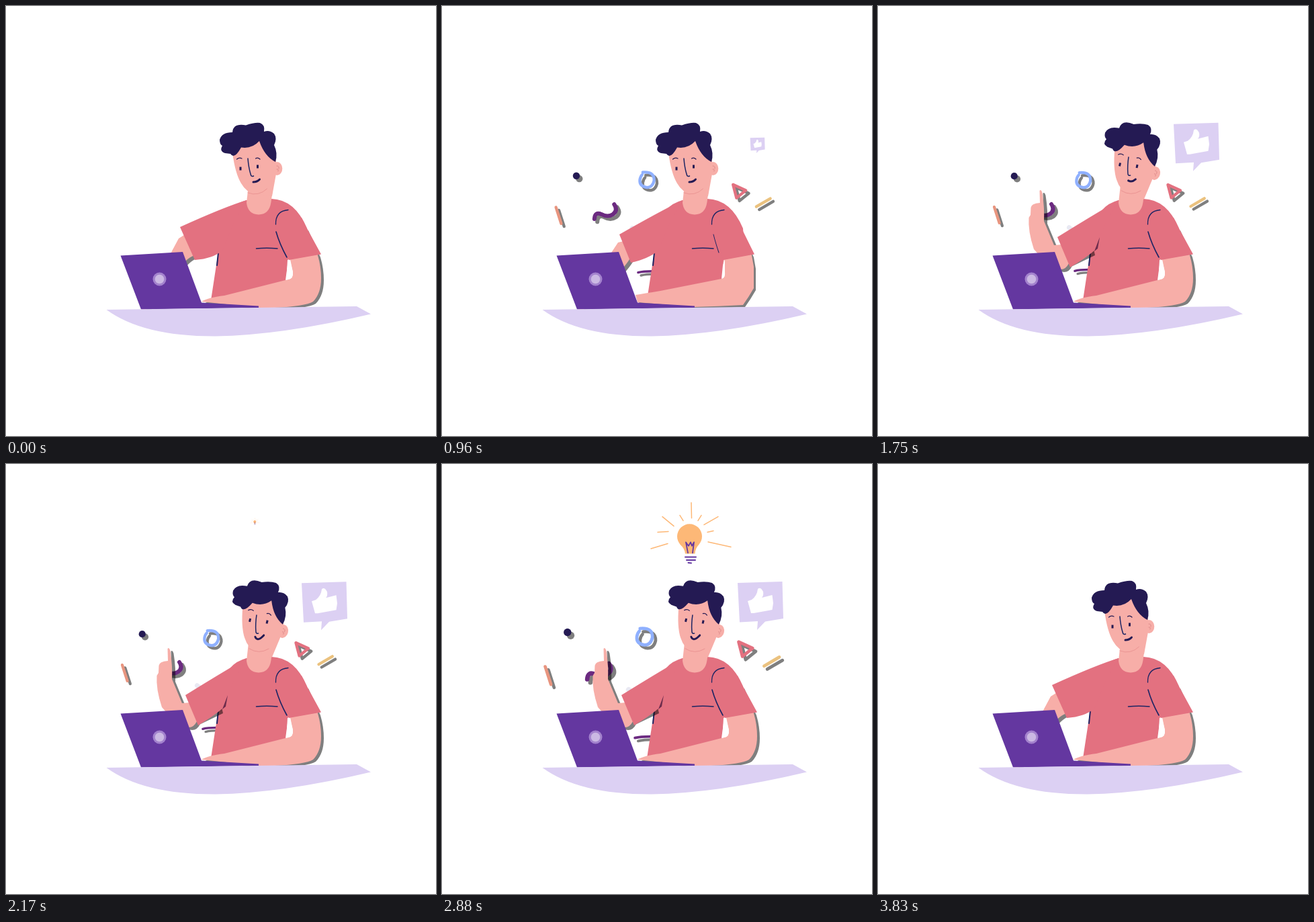
An HTML page with a canvas that plays this animation: 640x640 px, repeating every 3.87 s.

```html
<!DOCTYPE html>
<html lang="en">
<head>
<meta charset="utf-8">
<title>Idea at the laptop</title>
<style>
  html, body { margin: 0; width: 100%; height: 100%; overflow: hidden; background: #fff; }
  canvas { display: block; }
</style>
</head>
<body>
<canvas id="stage" width="640" height="640"></canvas>
<script>
const ctx = document.getElementById('stage').getContext('2d');
const LOOP = 3870, FPS = 24;
const SKIN = '#f7aea8', SHIRT = '#e37180', NAVY = '#241a53', LINE = '#1b2463',
      PURPLE = '#6437a0', PLUM = '#6b2a80', LILAC = '#dcd0f3', ORANGE = '#fdb877';

const clamp = v => Math.max(0, Math.min(1, v));
const smooth = v => (v = clamp(v), v * v * (3 - 2 * v));
const lerp = (a, b, k) => a + (b - a) * k;

function fill(path, color) {
  ctx.fillStyle = color;
  ctx.fill(new Path2D(path));
}
function stroke(path, color, width) {
  ctx.strokeStyle = color;
  ctx.lineWidth = width;
  ctx.stroke(new Path2D(path));
}
function disc(x, y, r, color) {
  ctx.fillStyle = color;
  ctx.beginPath();
  ctx.arc(x, y, r, 0, 7);
  ctx.fill();
}
function shadow(x, y) {
  ctx.shadowColor = 'rgba(0,0,0,.5)';
  ctx.shadowOffsetX = x;
  ctx.shadowOffsetY = y;
}
function group(draw) {
  ctx.save();
  draw();
  ctx.restore();
}
function scaleAbout(x, y, s, dy = 0) {
  ctx.translate(x, y + dy);
  ctx.scale(s, s);
  ctx.translate(-x, -y);
}

// Blend two path strings of the same structure
function mix(a, b, k) {
  const number = /-?[\d.]+/g, target = b.match(number);
  let i = 0;
  return a.replace(number, v => lerp(+v, +target[i++], k));
}

// Eased value between [time, value] keys; values are arrays
function track(keys, t) {
  let i = 0;
  while (i < keys.length - 2 && t >= keys[i + 1][0]) i++;
  const [t0, a] = keys[i], [t1, b] = keys[i + 1];
  const k = smooth((t - t0) / (t1 - t0));
  return a.map((v, j) => lerp(v, b[j], k));
}

// Poses: sleeve hem top, hem bottom, shoulder curve, crook, elbow, upper arm, hand offset
const TYPE_UP = [259, 329, 281, 378, 325, 299, 257, 346, 262, 377, 295, 350, -28, 97];
const TYPE_DOWN = [264, 340, 281, 382, 320, 308, 262, 352, 270, 393, 295, 350, -28, 97];
const LOW = [268, 348, 288, 391, 320, 310, 268, 358, 278, 408, 300, 350, 0, 100];
const POINT = [267, 344, 286, 389, 317, 313, 262, 356, 272, 408, 318, 367, 0, 0];
const LOWER = [266, 341, 285, 388, 319, 311, 259, 356, 274, 398, 300, 355, 3, 28];
const ARM = [[80, TYPE_UP], [205, TYPE_DOWN], [392, TYPE_UP], [580, TYPE_DOWN], [767, TYPE_UP],
  [955, TYPE_DOWN], [1330, LOW], [1620, POINT], [3180, POINT], [3330, LOWER], [3470, LOW], [3640, TYPE_UP]];
const TILT = [[1080, [0]], [1580, [12.5]], [3080, [12.5]], [3580, [0]]];
const SMILE = [[1650, [0]], [1950, [1]], [3350, [1]], [3600, [0]]];

function burstScale(t) {
  if (t < 500) return 1.015 * clamp((t - 340) / 160);
  if (t < 700) return lerp(1.015, 0.985, (t - 500) / 200);
  const pulse = 0.9175 + 0.0675 * Math.cos((t - 700) / 420 * 2 * Math.PI);
  return pulse * clamp((3342 - t) / 125);
}

function burst(t) {
  const s = burstScale(t);
  if (s <= 0) return;
  group(() => {
    scaleAbout(343, 277, s);
    shadow(5 * s, 5 * s);
    disc(178, 249, 6, NAVY);
    stroke('M143 303L152 331', '#e8957f', 5);
    stroke('M209 323Q210 310 221 315Q232 321 241 315Q250 308 243 298', PLUM, 7);
    stroke('M292 243Q312 241 311.500 257Q309 269 299 269Q286 267 287 256Q288 250 291 247', '#8fb0ff', 5);
    stroke('M447 264L469 274L453 287Z', SHIRT, 5);
    stroke('M487 302L511 288', '#ebc27f', 5);
    stroke('M284 415Q295 412 320 413', PLUM, 4);
    stroke('M274 339L281 345', '#e9e9f3', 8);
  });
}

// Spring in from `start`, shrink away towards `end`
function pop(t, start, end, swing, x, y, draw) {
  const u = t - start;
  const s = Math.min(1, u / 180, (end - t) / 235);
  if (s <= 0) return;
  group(() => {
    scaleAbout(x, y, s, -swing * Math.exp(-u / 220) * Math.sin(Math.PI * u / 370));
    draw();
  });
}

function bubble() {
  fill('M440 177L506.500 175L508 230L481 234.500L469 247L470 234L443 235.500Z', LILAC);
  fill('M455 204L461 202Q469 196 470 186Q474 182 478 190Q479 196 476 199L491.500 195L493 207L491.500 217L464 222L460 222Z', '#fff');
}

function bulb() {
  stroke('M371 57L371.500 80M328 78L345 92M354 76L359 84M386 76L381 84M411 78L390 90' +
    'M321 101L337 100M395 101L404 99M311 125.500L336 118M396 115.500L430 123', ORANGE, 1.5);
  fill('M362 133Q361 125 355 120A18.500 18.500 0 1 1 382 120Q377 125 376.500 133Z', ORANGE);
  stroke('M366 132L363 116L367 121.500L370 116L372 121.500L375 116L373 132', PURPLE, 1.8);
  stroke('M362 138L378 138M364 142.500L377 142.500M366.500 146.500L371 147', PURPLE, 2);
}

function torso() {
  fill('M358 289Q328 297 322 330L316 366L305 438L417 412L419 378L450 360L448 331Q430 288 395 287Z', SHIRT);
  stroke('M316 367L314 386', LINE, 2);
  stroke('M372.500 361Q388 359.500 404 361', LINE, 1.5);
}

function rightArm(k) {
  group(() => {
    shadow(lerp(4, 3, k), 3);
    fill(mix(
      'M422 376L427 396Q428 406 420 407L416 408L325 431Q300 434 291 440L376 449L400 449Q445 447 457 440Q469 428 469 405Q469 388 464 371L446 331L430 345Z',
      'M419 376L421 395Q422 405 416 406L406 408L325 424Q300 428 288 430L291 441L376 448L412 447Q448 445 456 434Q464 420 464 405Q464 388 461 371L444 333L428 345Z', k), SKIN);
  });
  // Gap between the body and the bent arm
  fill(mix('M419 386L423 377L427 396Q428 406 420 407L416 408Z',
           'M418 386L421 377L421 395Q422 405 416 406L416 406Z', k), '#fff');
  fill(mix('M395 300L440 315L448 331L469 369.500L421 378L402 335Z',
           'M395 300L440 317L447 333L465 369.500L419 378L404 340Z', k), SHIRT);
  stroke(mix('M402 336Q407 354 418 374', 'M404 340Q407 352 412 367', k), LINE, lerp(1.6, 1, k));
  stroke('M401.500 325Q401 305 420 303.500', LINE, 1.3);
}

function leftArm(t) {
  const [hx, hy, bx, by, cx, cy, kx, ky, ex, ey, ux, uy, px, py] = track(ARM, t);
  const hem = k => `${lerp(hx, bx, k)} ${lerp(hy, by, k)}`;
  const hand = (x, y) => `${x + px} ${y + py}`;
  group(() => {
    shadow(5, 4);
    fill(`M${hand(240.5, 275)}Q${hand(242.5, 272)} ${hand(244.5, 278)}Q${hand(248, 300)} ${hand(247, 320)}
      L${kx} ${ky}L${hem(0.25)}L310 330L${ux} ${uy}L${hem(0.88)}Q${ex} ${ey} ${hand(232, 362)}
      Q${hand(223, 335)} ${hand(224.5, 315)}L${hand(227, 311)}L${hand(227.5, 300)}Q${hand(228, 294)} ${hand(241, 293)}Z`, SKIN);
  });
  fill(`M358 289Q${cx} ${cy} ${hx} ${hy}L${bx} ${by}Q308 376 322 364L340 320Z`, SHIRT);
  const bend = clamp((by - 382) / 7) * clamp((ux - 294) / 6);
  group(() => {
    ctx.globalAlpha = bend;
    fill('M330 344L322 365L327 361Z', '#6d2c4c');
  });
}

function head(t) {
  const [tilt] = track(TILT, t), [smile] = track(SMILE, t);
  fill('M361 266L358 293Q360 310 376 310.500Q392 310 394.500 292L398 266Z', SKIN);
  group(() => {
    ctx.translate(376, 285);
    ctx.rotate(tilt * Math.PI / 180);
    ctx.translate(-376, -285);
    ctx.fillStyle = SKIN;
    ctx.beginPath();
    ctx.ellipse(403.5, 242, 7.8, 10, 0, 0, 7);
    ctx.fill();
    fill('M337 218Q341 249 350 264Q358 278 371 280L396 283L402 250L402 230L380 195L345 202Z', SKIN);
    stroke('M360 278Q376 284 388.500 272', '#e8908f', 0.8);
    stroke('M403 238Q407 238 406 242M403 243Q406 242 405 246', '#d98585', 0.8);
    fill('M334 220Q340 229 350 210.500Q366 213 377 201Q385 224 401 232Q405 219 399 207Q404 197 399 190Q392 184 384 187Q386 177 378 174Q370 173 357 177.500Q338 174 337 188Q321 188 318 199Q318 206 322 208Q317 216 326 219Z', NAVY);
    stroke('M360 227Q361 240 364 250Q365 255 368.500 253', LINE, 1.5);
    stroke(mix('M368 262Q374 262 377.500 258', 'M365 259Q370 266 377 254', smile), NAVY, 3);
    group(() => {
      ctx.translate(3 * smile, -5.5 * smile);
      stroke('M343.500 228Q347 225 351 227M371.500 227Q375 225 378 228', NAVY, 1.2);
      const open = Math.max(0.15, Math.min(1, Math.abs(t - 620) / 60));
      for (const [x, y] of [[349, 242], [374.5, 239]]) {
        ctx.fillStyle = NAVY;
        ctx.fillRect(x - 1.5, y - 2.5 * open, 3, 5 * open);
      }
    });
  });
}

function desk() {
  fill('M170.500 371.500L263 366L291 441.500L376 446.500L376 449L201 451.500Z', PURPLE);
  disc(228.5, 406.5, 10, '#a382cd');
  disc(228.5, 406.5, 6.8, '#cbb9e3');
  fill('M149.500 452L522 447L543 458.500Q410 490 312 491.500Q204 492 149.500 452Z', LILAC);
}

function frame(now) {
  const t = Math.floor((now % LOOP + 4) * FPS / 1000) * 1000 / FPS;
  const typing = t > 205 && t < 1517 ? (1 + Math.cos((t - 580) / 375 * 2 * Math.PI)) / 2 : 0;
  ctx.clearRect(0, 0, 640, 640);
  ctx.lineCap = ctx.lineJoin = 'round';
  burst(t);
  pop(t, 900, 3436, 75, 467.5, 246, bubble);
  pop(t, 2147, 3660, 110, 370.5, 102, bulb);
  torso();
  leftArm(t);
  rightArm(typing);
  head(t);
  desk();
  requestAnimationFrame(frame);
}
requestAnimationFrame(frame);
</script>
</body>
</html>
```
